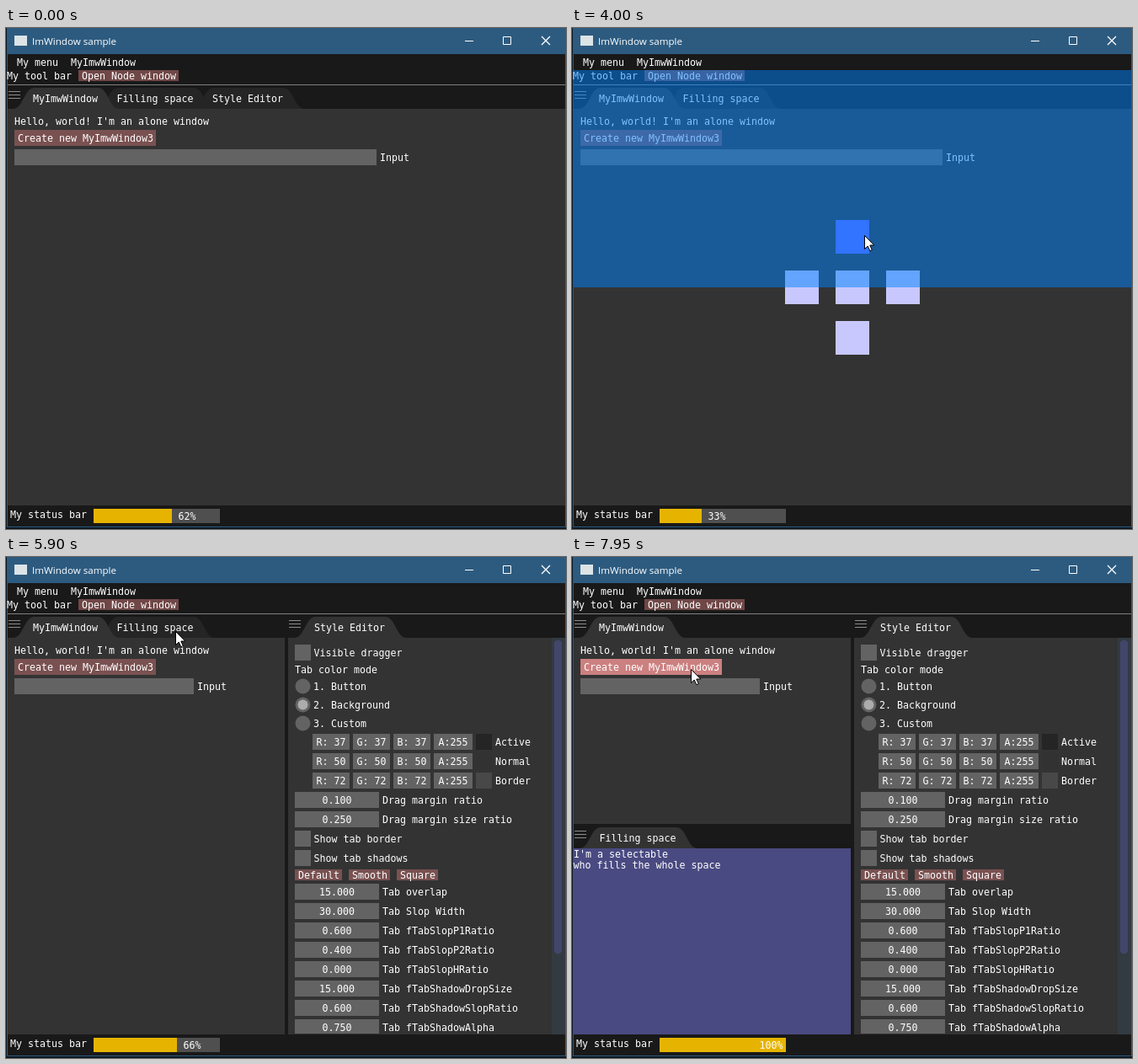
An HTML page for the animation above (8000 ms loop, 665 by 595 pixels).

```html
<!DOCTYPE html>
<html lang="en">
<head>
<meta charset="utf-8">
<title>ImWindow sample</title>
<style>
  html, body { margin: 0; width: 100%; height: 100%; overflow: hidden; background: #0c1720; }
  svg { display: block; }
  rect { shape-rendering: crispEdges; }
  text { font: 11.63px "DejaVu Sans Mono", monospace; fill: #fff; }
  text.title { font: 11.6px "Open Sans", sans-serif; }
</style>
</head>
<body>
<svg id="stage" width="665" height="595" viewBox="0 0 665 595"></svg>
<script>
const LOOP = 8000, STEP = 50;
const DARK = '#191919', BODY = '#333', FIELD = '#636363';
const BUTTON = 'rgba(171,102,102,.6)', BUTTON_HOVER = '#ab6666', BUTTON_DOWN = '#cc8080';

// Times of the state changes, in ms
const TIME = { pointer: 2550, drag1: 3500, dock1: 4850, drag2: 6050, dock2: 6650, press: 7850 };

const PROGRESS = [[0, 62], [850, 78], [2050, 99.4], [2099, 100], [2100, .4], [4000, 33.3],
  [4850, 47.3], [5900, 66], [6500, 74.4], [7950, 100], [8000, 100]];

const POINTER = [[2550, 280, 556], [3300, 277, 82], [3500, 277, 84], [3950, 347, 246],
  [4050, 347, 246], [4700, 391, 315], [4900, 391, 315], [5800, 201, 88], [6000, 201, 88],
  [6450, 170, 366], [6700, 170, 366], [7450, 141, 133], [8000, 141, 133]];

const linear = k => k;
const smooth = k => k * k * (3 - 2 * k);

function sample(keys, t, ease) {
  const i = Math.max(1, keys.findIndex(key => key[0] > t));
  const [t0, ...from] = keys[i - 1], [t1, ...to] = keys[i];
  const k = ease(Math.min(1, Math.max(0, (t - t0) / (t1 - t0))));
  return from.map((v, n) => v + (to[n] - v) * k);
}

// Drawing helpers; boxes are given by their edges
const box = (x0, y0, x1, y1, fill, more = '') =>
  `<rect x="${x0}" y="${y0}" width="${x1 - x0}" height="${y1 - y0}" fill="${fill}" ${more}/>`;
const text = (x, y, s, more = '') => `<text x="${x}" y="${y}" ${more}>${s}</text>`;
const path = (d, more) => `<path d="${d}" ${more}/>`;
const disc = (x, y, r, fill) => `<circle cx="${x}" cy="${y}" r="${r}" fill="${fill}"/>`;
const inside = ([x, y], x0, y0, x1, y1) => x >= x0 && x < x1 && y >= y0 && y < y1;

function button(x, y, label, height = 13, fill = BUTTON) {
  const pad = (height - 13) / 2;
  return box(x, y, x + label.length * 7 + 7, y + height, fill) + text(x + 4, y + pad + 11, label);
}

function tabShape(x, top, label, fill) {
  const l = x - 24, r = x + label.length * 7 + 26, b = top + 25;
  return path(`M${l},${b}C${l + 13},${b} ${l + 13},${top} ${l + 26},${top}H${r - 26}` +
    `C${r - 13},${top} ${r - 13},${b} ${r},${b}Z`, `fill="${fill}"`);
}

function tabBar(left, labelX, top, labels) {
  let x = labelX, icon = '', shapes = '', names = '';
  for (const y of [4, 8, 12]) icon += box(left + 1, top + y, left + 15, top + y + 1, '#8c8c8c');
  labels.forEach((label, i) => {
    shapes = tabShape(x, top, label, i ? '#252525' : BODY) + shapes;
    names += text(x, top + 17, label);
    x += label.length * 7 + 22.5;
  });
  return icon + shapes + names;
}

function frame() {
  const white = 'fill="none" stroke="#fff"';
  return box(0, 0, 665, 595, '#0c1720') + box(1, 0, 665, 593, '#2d5b80') +
    box(2, 31, 664, 592, DARK) + box(10, 9, 25, 21, '#dce4e6') +
    text(31, 20, 'ImWindow sample', 'class="title"') +
    path('M545,15.5h10M590.5,10.5h9v9h-9z', white) +
    path('M636.5,10.5l9,9m0,-9l-9,9', white + ' stroke-width="1.3" stroke-linecap="square"') +
    text(13, 45, 'My menu') + text(77, 45, 'MyImwWindow') + text(1, 61, 'My tool bar') +
    button(86, 50, 'Open Node window') + box(2, 67, 664, 68, '#808080');
}

function mainPane(tabs, right, bottom, inputRight, buttonFill) {
  return box(2, 96, right, bottom, BODY) + tabBar(2, 32, 71, tabs) +
    text(10, 115, "Hello, world! I'm an alone window") +
    button(10, 121, 'Create new MyImwWindow3', 19, buttonFill) +
    box(10, 144, inputRight, 163, FIELD) + text(inputRight + 4, 158, 'Input');
}

function fillingPane(hovered) {
  return tabBar(2, 32.5, 321, ['Filling space']) +
    box(2, 346, 331, 567, hovered ? '#6666c2' : '#4a4a82') +
    text(2, 357, "I'm a selectable") + text(1.5, 370, 'who fills the whole space');
}

function stylePane() {
  const check = (y, label) => box(343, y, 362, y + 19, FIELD) + text(365.5, y + 14, label);
  const slider = (y, value, label) => box(343, y, 443, Math.min(y + 19, 566), FIELD) +
    text(393, y + 14, value.toFixed(3), 'text-anchor="middle"') + text(447, y + 14, label);
  let out = box(335, 96, 664, 567, BODY) + tabBar(335, 366, 71, ['Style Editor']) +
    box(648, 96, 664, 567, '#333b42') + box(651, 99, 660, 471, '#42466b', 'rx="4"') +
    check(104, 'Visible dragger') + text(343, 138, 'Tab color mode');
  ['Button', 'Background', 'Custom'].forEach((name, i) => {
    const y = 153.5 + i * 22;
    out += disc(352.5, y, 9, FIELD) + text(365, y + 4.5, `${i + 1}. ${name}`);
    if (i === 1) out += disc(352.5, y, 6, '#acacac');
  });
  [['Active', 37], ['Normal', 50], ['Border', 72]].forEach(([name, v], i) => {
    const y = 210 + i * 23;
    [`R: ${v}`, `G: ${v}`, `B: ${v}`, 'A:255'].forEach((s, n) => {
      const x = 364 + n * 48, width = n < 3 ? 44 : 46;
      out += box(x, y, x + width, y + 19, FIELD) +
        text(x + width / 2, y + 14, s, 'text-anchor="middle"');
    });
    out += box(558, y, 577, y + 19, `rgb(${v},${v},${v})`) + text(581, y + 14, name);
  });
  out += slider(279, .1, 'Drag margin ratio') + slider(302, .25, 'Drag margin size ratio') +
    check(325, 'Show tab border') + check(348, 'Show tab shadows') +
    button(343, 371, 'Default') + button(407, 371, 'Smooth') + button(464, 371, 'Square');
  [[15, 'overlap'], [30, 'Slop Width'], [.6, 'fTabSlopP1Ratio'], [.4, 'fTabSlopP2Ratio'],
    [0, 'fTabSlopHRatio'], [15, 'fTabShadowDropSize'], [.6, 'fTabShadowSlopRatio'],
    [.75, 'fTabShadowAlpha']].forEach(([v, name], i) => {
    out += slider(388 + i * 23, v, 'Tab ' + name);
  });
  return out;
}

// Five drop targets, with a preview of the area under the hovered one
function dropTargets(pointer, x0, y0, x1, y1) {
  const cx = Math.floor((x0 + x1) / 2), cy = Math.floor((y0 + y1) / 2);
  const targets = [
    [0, 0, x0, y0, x1, y1], [0, -1, x0, y0, x1, cy], [0, 1, x0, cy, x1, y1],
    [-1, 0, x0, y0, cx, y1], [1, 0, cx, y0, x1, y1]];
  let out = '', preview = '';
  for (const [dx, dy, ...area] of targets) {
    const x = cx + dx * 60 - 20, y = cy + dy * 60 - 20;
    const hot = inside(pointer, x, y, x + 40, y + 40);
    out += box(x, y, x + 40, y + 40, hot ? '#6464ff' : '#c8c8ff');
    if (hot) preview = box(...area, 'rgba(0,130,255,.5)');
  }
  return out + preview;
}

function statusBar(t) {
  const [percent] = sample(PROGRESS, t, linear);
  const label = Math.round(percent) + '%';
  const end = 104 + Math.max(1, Math.round(percent * 1.5));
  const x = Math.min(end + 7.5, 250 - label.length * 7 + .5);
  return box(2, 567, 664, 592, DARK) + text(5, 582, 'My status bar') +
    box(104, 571, 254, 588, '#4f4f4f') + box(104, 571, end, 588, '#e6b400') + text(x, 584, label);
}

const arrow = ([x, y]) => path('M.5,.5V16.5L4.2,13 6.8,18.7 9.3,17.6 6.8,12H11.8Z',
  `transform="translate(${x},${y})" fill="#fff" stroke="#000"`);

function scene(t) {
  const pointer = sample(POINTER, t, smooth).map(Math.round);
  const docked = t >= TIME.dock1, split = t >= TIME.dock2;
  const drag1 = t >= TIME.drag1 && t < TIME.dock1 + STEP;
  const drag2 = t >= TIME.drag2 && t < TIME.dock2 + STEP;

  const tabs = ['MyImwWindow'];
  if (t < TIME.drag2) tabs.push('Filling space');
  if (t < TIME.drag1) tabs.push('Style Editor');

  const onButton = split && inside(pointer, 10, 121, 178, 140);
  const fill = !onButton ? BUTTON : t >= TIME.press ? BUTTON_DOWN : BUTTON_HOVER;

  let out = frame() + mainPane(tabs, docked ? 331 : 664, split ? 317 : 567, docked ? 223 : 440, fill);
  if (docked) out += stylePane();
  if (split) out += fillingPane(inside(pointer, 2, 346, 331, 567));
  out += statusBar(t);
  if (drag1) out += dropTargets(pointer, 2, 50, 664, 567);
  if (drag2) out += dropTargets(pointer, 2, 71, 331, 567);
  if (t >= TIME.pointer) out += arrow(pointer);
  return out;
}

const stage = document.getElementById('stage');
const start = performance.now();
let shown = -1;

function tick() {
  const t = Math.floor(((performance.now() - start) % LOOP) / STEP) * STEP;
  if (t !== shown) stage.innerHTML = scene(shown = t);
  requestAnimationFrame(tick);
}
tick();
</script>
</body>
</html>
```
